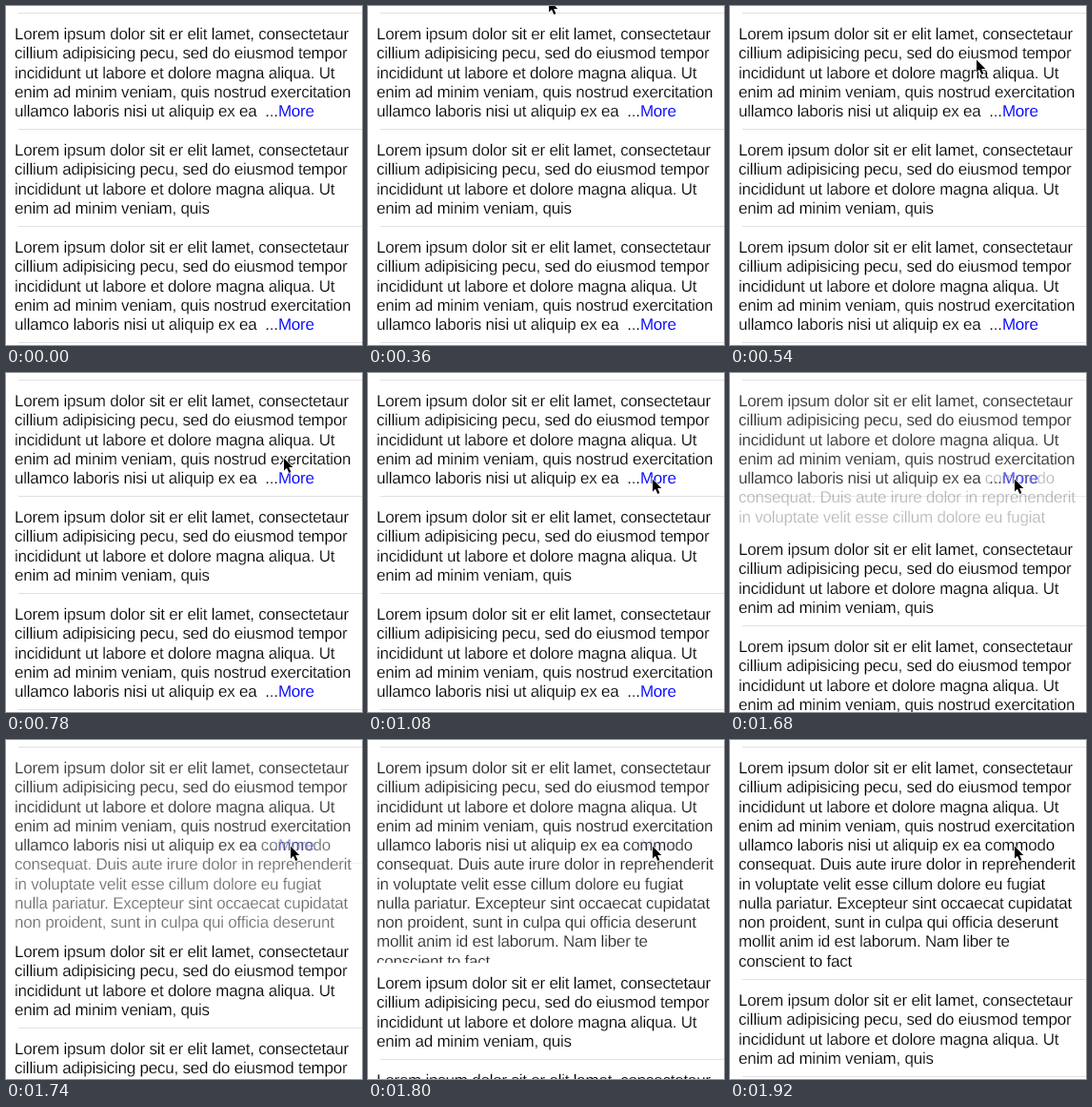
Write an HTML page that moves like this. It is 374x356 px and loops after 4200 ms.

```html
<!DOCTYPE html>
<html lang="en">
<head>
<meta charset="utf-8">
<title>Expanding list</title>
<style>
  html, body { margin: 0; width: 100%; height: 100%; overflow: hidden; background: #fff; }
  svg { display: block; }
  text {
    font: 17px "Liberation Sans", Arial, sans-serif;
    letter-spacing: -0.225px;
    white-space: pre;
    text-rendering: geometricPrecision;
    fill: #000;
    stroke: #fff;
    stroke-width: 0.22px;
  }
  .more { fill: #00f; stroke-width: 0.1px; }
  .rule { fill: #e1e1e2; }
  #short, #long { mix-blend-mode: multiply; }
</style>
</head>
<body>
<svg id="stage" width="374" height="356" viewBox="0 0 374 356">
  <clipPath id="cell"><rect id="window" x="0" y="8" width="374" height="122"/></clipPath>
  <rect class="rule" x="13" y="7" width="361" height="1"/>
  <g id="short"></g>
  <g clip-path="url(#cell)" style="mix-blend-mode:multiply"><g id="long"></g></g>
  <g id="below"></g>
  <path id="pointer" d="M1 1.5V14.5L4 11.7L6.3 17L8.4 16.1L6.2 11H10.3Z"
        fill="#000" stroke="#fff" stroke-width="1.4" paint-order="stroke"/>
</svg>
<script>
const LOOP = 4200, STEP = 60, LINE = 20.25;
const NS = "http://www.w3.org/2000/svg";
const $ = id => document.getElementById(id);

const lines = [
  "Lorem ipsum dolor sit er elit lamet, consectetaur",
  "cillium adipisicing pecu, sed do eiusmod tempor",
  "incididunt ut labore et dolore magna aliqua. Ut",
  "enim ad minim veniam, quis nostrud exercitation",
  "ullamco laboris nisi ut aliquip ex ea commodo",
  "consequat. Duis aute irure dolor in reprehenderit",
  "in voluptate velit esse cillum dolore eu fugiat",
  "nulla pariatur. Excepteur sint occaecat cupidatat",
  "non proident, sunt in culpa qui officia deserunt",
  "mollit anim id est laborum. Nam liber te",
  "conscient to fact"
];
const folded = [...lines.slice(0, 4), "ullamco laboris nisi ut aliquip ex ea  ..."];
const brief = [...lines.slice(0, 3), "enim ad minim veniam, quis"];

function add(parent, tag, attrs, content = "") {
  const el = document.createElementNS(NS, tag);
  for (const k in attrs) el.setAttribute(k, attrs[k]);
  el.textContent = content;
  return parent.appendChild(el);
}

function addCell(parent, rows, top, bottom, more) {
  rows.forEach((row, i) => {
    const el = add(parent, "text", { x: 9, y: top + 28 + Math.round(i * LINE) }, row);
    if (more && i === rows.length - 1) add(el, "tspan", { class: "more" }, "More");
  });
  add(parent, "rect", { class: "rule", x: 13, y: bottom, width: 361, height: 1 });
}

addCell($("short"), folded, 7, 129, true);
addCell($("long"), lines, 7, 251);
addCell($("below"), brief, 129, 231);
addCell($("below"), folded, 231, 353, true);

// time, x, y of the pointer
const path = [
  [360, 189, -8], [420, 215, 18], [480, 239, 40], [540, 258, 55],
  [600, 270, 67], [660, 279, 76], [720, 286, 83], [780, 291, 88],
  [840, 293, 91], [900, 294, 95], [960, 296, 102], [1020, 297, 107], [1080, 298, 110]
];
// extra height of the first cell, one value per step
const OPEN = 1620, growth = [5, 34, 71, 104, 120, 122];

function draw(time) {
  const t = Math.floor((time % LOOP) / STEP) * STEP;

  const at = path.filter(p => p[0] <= t).pop();
  $("pointer").style.display = at ? "" : "none";
  if (at) $("pointer").setAttribute("transform", `translate(${at[1]} ${at[2]})`);

  const n = (t - OPEN) / STEP;
  const dy = n < 0 ? 0 : growth[Math.min(n, growth.length - 1)];
  const p = dy / 122;
  $("short").style.opacity = 1 - p;
  $("long").style.opacity = p;
  $("window").setAttribute("height", 122 + dy);
  $("below").setAttribute("transform", `translate(0 ${dy})`);
}

let start;
function tick(now) {
  start ??= now;
  draw(now - start);
  requestAnimationFrame(tick);
}
draw(0);
requestAnimationFrame(tick);
</script>
</body>
</html>
```
